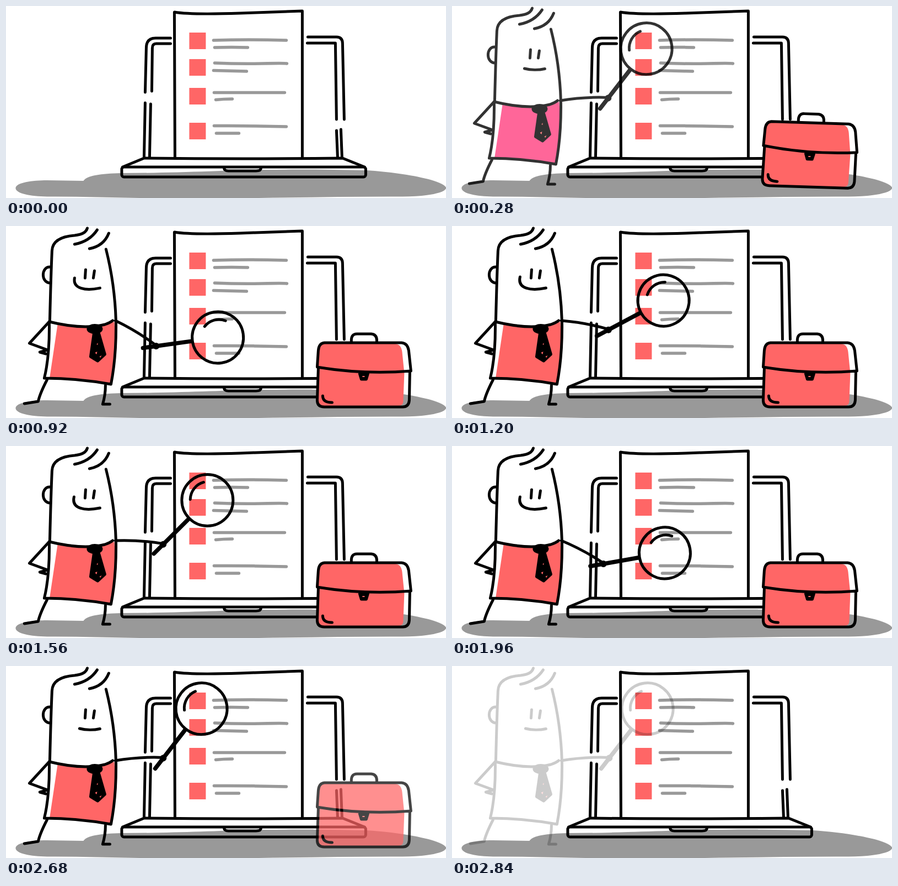
Animation of 798 by 347 pixels, one loop 2.88 s. Source, as an HTML page:

```html
<!DOCTYPE html>
<html lang="en">
<head>
<meta charset="utf-8">
<title>Checklist review</title>
<style>
html, body { margin: 0; width: 100%; height: 100%; overflow: hidden; background: #fff; }
svg { display: block; width: 100%; height: 100%; }
.ink { fill: none; stroke: #000; stroke-width: 5; stroke-linecap: round; stroke-linejoin: round; }
.paper { fill: #fff; }
.solid { fill: #000; }
.red { fill: #f66; stroke: none; }
.text { fill: none; stroke: #999; stroke-width: 5.5; stroke-linecap: round; }
</style>
</head>
<body>
<svg viewBox="0.6 0 798 347">
  <path fill="#999" d="M18 329C19 319 48 315 75 315L141 316C148 306 172 303 210 302C300 302 400 297 470 296C540 295 600 296 655 297C720 301 796 315 799 329C796 339 760 344 720 344.500C590 344 460 348 330 348C240 348 160 344 75 344.500C45 344 18 339 18 329Z"/>

  <g class="ink">
    <path d="M299 58H272Q255 58 255 76L253 156M253 175L251 274M299 68H273Q266 68 266 76L265 154M263 177L261 273"/>
    <path d="M548 56H600Q611 56 611 68L614 205M608 223L610 274M547 67H598L600 205M600 225L602 273"/>
    <path class="paper" d="M307 275L306 11Q335 16 425 13T538 9L538 275"/>
    <path d="M651 291L611 275Q430 277 251 275L212 291"/>
    <rect x="210.500" y="291" width="442.500" height="18" rx="4"/>
    <path d="M396 292Q396 298 404 298H454Q463 298 463 293"/>
  </g>
  <path class="red" d="M333 48h30v30h-30zM333 96h30v30h-30zM333 148h30v30h-30zM333 211h30v30h-30z"/>
  <path class="text" d="M377 62Q440 60 509 62M379 75Q410 74 439 75M379 103Q425 105 465 104T510 104M377 116.500L437 118M378 156.500H506M381 169.500Q395 168 411 168M378 216.500Q440 216 509 218M382 230H423"/>

  <g id="case" class="ink">
    <path class="red" d="M576 213H706Q717 213 719 227L723 266L721 318Q720 325 712 325H577Q567 325 567 315V227Q567 213 576 213Z"/>
    <path d="M578 211H718Q729 212 731 225L735 262Q650 269 565 255L567 225Q568 212 578 211ZM567 257L565 315Q565 327 578 327H720Q731 327 732 315L733 264"/>
    <path d="M627 209Q626 195 637 195H663Q674 196 673 209M575 307Q575 319 592 319"/>
    <path class="solid" d="M642 267L645 277H654L657 267Z"/>
    <path class="red" d="M647 271h4v2h-4z"/>
  </g>

  <g id="man" class="ink">
    <path id="shirt" stroke="none" d="M94 179Q140 185 180 178L197 173Q202 235 191 284Q140 275 80 273Z"/>
    <path d="M148 4Q145 15 125 17Q85 20 84 45Q82 90 80 172M166 7Q152 28 125 33M187 13Q178 36 152 41"/>
    <path d="M182 42Q198 105 200 172Q201 235 191 286Q130 275 70 275Q80 235 79 173Q140 188 180 178Q189 175 194 171"/>
    <path d="M80 74C64 74 64 102 80 103M79 173L43 212L76 224L62 228L73 231"/>
    <path d="M75 278Q62 303 59 317L34 321M181 288Q181 305 176 322H189"/>
    <path id="eyes" d="M145 79L144 94M161 81L159 94"/>
    <path id="smile"/>
    <ellipse class="solid" cx="161.500" cy="186" rx="12" ry="6.500"/>
    <path class="solid" d="M160 194H169L180 232L167 244L154 236Z"/>
    <path class="red" d="M162 229l4 -2l-1 5zM170 236l4 -2l-2 4zM165 214l2 -3v4z"/>
    <path id="arm"/>
    <g id="glass">
      <path d="M-24 0H65" stroke-width="7.500"/>
      <circle class="solid" r="3.500"/>
      <circle cx="113" r="46.500"/>
      <path d="M92 -23A33 33 0 0 1 131 -28"/>
    </g>
  </g>
</svg>
<script>
const LOOP = 2880, STEP = 40;
const SHOULDER = { x: 199, y: 171 }, ARM = 87;
// Shirt colour for each step of the man's opacity.
const SHIRT_TINTS = ['#fff', '#fff', '#ff8080', '#f55', '#ff4080', '#f66'];

// Keys are [time, degrees], joined by cosine easing.
const ARM_SWING = [[335, -3], [969, 32.5], [1360, -1], [2122, 32.5], [2478, -3]];
const GLASS_SWING = [[328, -52.2], [960, -7.5], [1440, -48.5], [2058, -7.5], [2496, -52.2]];
const BLINKS = [1420, 2440];
const SMALL_SMILE = [134, 113, 145, 116, 160, 116, 171, 113.5];
const BIG_SMILE = [124, 92, 119, 113, 143, 118, 171, 112];

const $ = id => document.getElementById(id);
const set = (id, name, value) => $(id).setAttribute(name, value);
const clamp = v => Math.max(0, Math.min(1, v));
const ramp = (t, from, to) => clamp((t - from) / (to - from));
const ease = u => (1 - Math.cos(Math.PI * u)) / 2;

function swing(keys, t) {
  let value = keys[0][1];
  for (let i = 1; i < keys.length; i++) {
    const [t0, v0] = keys[i - 1], [t1, v1] = keys[i];
    value += (v1 - v0) * ease(ramp(t, t0, t1));
  }
  return value;
}

function drawMan(t) {
  const level = Math.round(5 * Math.min(ramp(t, 0, 350), 1 - ramp(t, 2680, 2880)));
  set('man', 'opacity', level / 5);
  set('man', 'transform', `translate(${-16 * (1 - ramp(t, 0, 433)) ** 2} 0)`);
  set('shirt', 'fill', SHIRT_TINTS[level]);

  const grin = ease(ramp(t, 760, 960)) - ease(ramp(t, 2480, 2680));
  const [x, y, ...curve] = SMALL_SMILE.map((v, i) => v + (BIG_SMILE[i] - v) * grin);
  set('smile', 'd', `M${x} ${y}C${curve}`);

  const shut = Math.max(...BLINKS.map(time => clamp(1 - Math.abs(t - time) / 60)));
  set('eyes', 'transform', `translate(0 88) scale(1 ${1 - 0.9 * shut}) translate(0 -88)`);

  const angle = swing(ARM_SWING, t) * Math.PI / 180;
  const along = (d, lift) => [
    SHOULDER.x + d * Math.cos(angle) + lift * Math.sin(angle),
    SHOULDER.y + d * Math.sin(angle) - lift * Math.cos(angle)
  ];
  set('arm', 'd', `M${along(0, 0)}Q${along(45, 5)} ${along(ARM, 1)}`);
  set('glass', 'transform', `translate(${along(ARM, 0)}) rotate(${swing(GLASS_SWING, t)})`);
}

function drawCase(t) {
  set('case', 'opacity', Math.min(ramp(t, 0, 200), 1 - ramp(t, 2620, 2840)));
  set('case', 'transform', `rotate(${5 * (1 - ramp(t, 0, 440))} 650 268)`);
}

function frame() {
  const t = Math.floor(performance.now() % LOOP / STEP) * STEP;
  drawMan(t);
  drawCase(t);
  requestAnimationFrame(frame);
}
frame();
</script>
</body>
</html>
```
